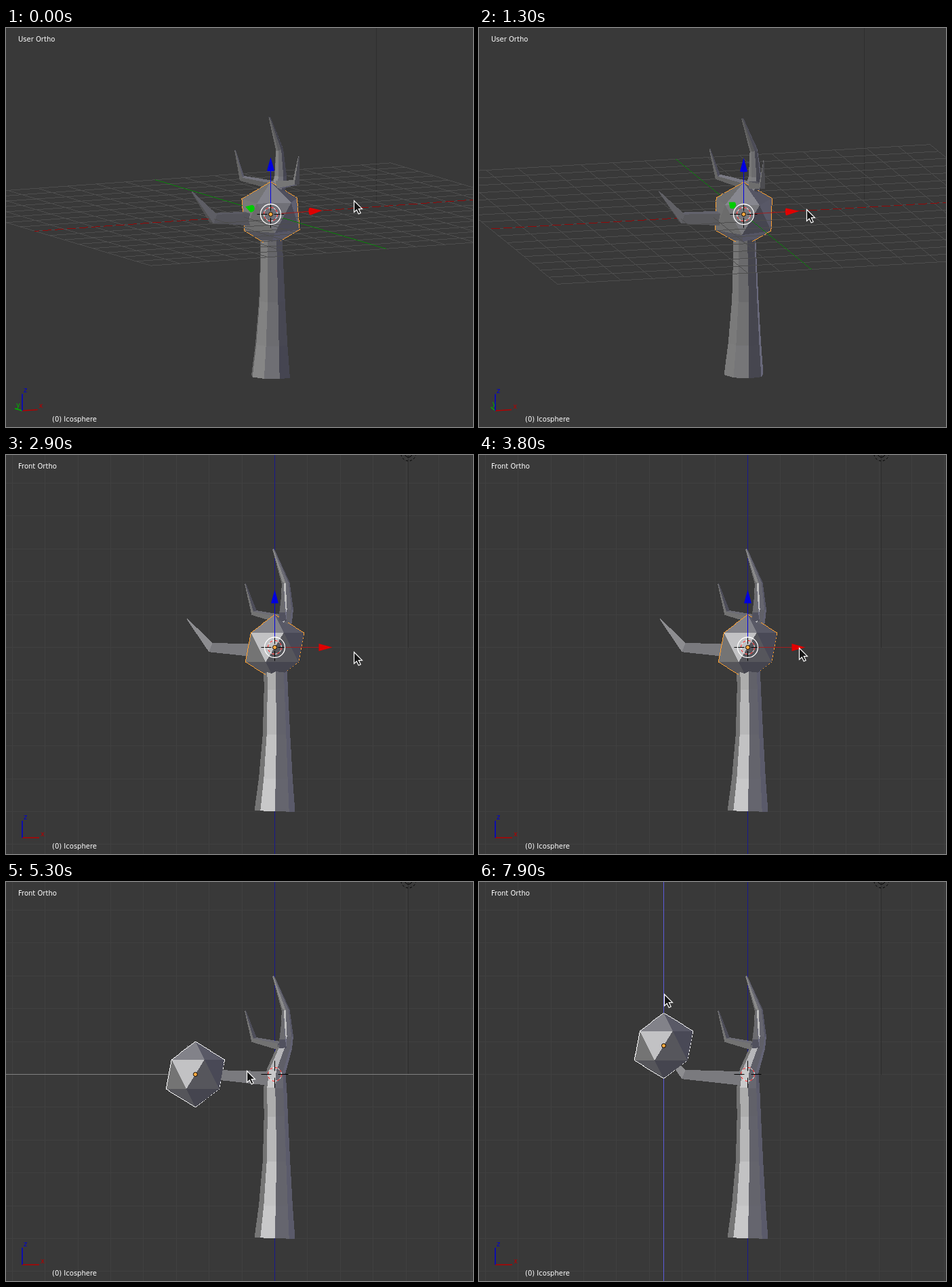
An HTML page with a canvas for the animation above (8 s loop, 689 by 588 pixels).

```html
<!DOCTYPE html>
<html lang="en">
<head>
<meta charset="utf-8">
<title>Viewport</title>
<style>
html, body { margin: 0; width: 100%; height: 100%; overflow: hidden; background: #393939; }
canvas { position: absolute; left: 0; top: 0; display: block; }
.label { position: absolute; font: 10px/12px "DejaVu Sans", sans-serif; color: #fff; white-space: pre; }
#view { left: 18px; top: 11px; }
#object { left: 68px; top: 571px; }
</style>
</head>
<body>
<canvas id="stage" width="689" height="588"></canvas>
<div class="label" id="view">User Ortho</div>
<div class="label" id="object">(0) Icosphere</div>
<script>
const W = 689, H = 588, UNIT = 48.4, FAR = 1000;
const LOOP = 8000, STEP = 100, FRONT_AT = 2900;
const ctx = document.getElementById('stage').getContext('2d');
const viewLabel = document.getElementById('view');
const image = ctx.createImageData(W, H);
const pixels = new Uint32Array(image.data.buffer);
const depth = new Float32Array(W * H);

const span = (t, from, to) => Math.min(1, Math.max(0, (t - from) / (to - from)));
const easeOut = (u, power) => 1 - (1 - u) ** power;
const mix = (a, b, f) => a + (b - a) * f;
const arc = u => Math.sin(Math.PI * u);

// The pointer drives everything: it orbits the view, then drags the ball along x and z.
function pose(t) {
  const orbit = span(t, 800, 1800), reach = span(t, 3300, 3800);
  const drag = easeOut(span(t, 4000, 6100), 3);
  const back = easeOut(span(t, 6300, 7200), 2.5);
  const ball = [-124 * drag, 0, 42.3 * span(t, 7200, 7900)];
  let mouse;
  if (t <= 3300) mouse = [513 - 30 * arc(orbit), 254 + 36 * orbit ** 1.5];
  else if (t <= 4000) mouse = [mix(513, 472, reach), mix(290, 284, reach) - 9 * arc(reach)];
  else mouse = [mix(472 + ball[0], 273, back), mix(284 - 6 * drag, 207, back) - ball[2]];
  return { az: 26.1 - 11.2 * arc(orbit), el: 8.4 + 14.4 * orbit ** 1.8, ball, mouse };
}

const sub = (a, b) => a.map((v, i) => v - b[i]);
const dot = (a, b) => a[0] * b[0] + a[1] * b[1] + a[2] * b[2];
const cross = (a, b) => [a[1] * b[2] - a[2] * b[1], a[2] * b[0] - a[0] * b[2], a[0] * b[1] - a[1] * b[0]];
const unit = a => { const n = Math.hypot(...a); return a.map(v => v / n); };
const rgb = (r, g, b) => (255 << 24 | b << 16 | g << 8 | r) >>> 0;

// Icosphere: two poles and two staggered rings of five.
const ball = [[0, 0, UNIT], [0, 0, -UNIT]];
for (let i = 0; i < 10; i++) {
  const a = i * Math.PI / 5, r = UNIT * 2 / Math.sqrt(5);
  ball.push([r * Math.cos(a), r * Math.sin(a), (i % 2 ? -1 : 1) * r / 2]);
}
const near = (i, j) => Math.hypot(...sub(ball[i], ball[j])) < UNIT * 1.2;
const ballFaces = [], ballEdges = [];
for (let i = 0; i < 12; i++) for (let j = i + 1; j < 12; j++) {
  if (!near(i, j)) continue;
  ballEdges.push([i, j]);
  for (let k = j + 1; k < 12; k++) if (near(i, k) && near(j, k)) ballFaces.push([i, j, k]);
}

// Tube along a path of points; side is the fixed cross axis of its rings.
const tree = [];
function tube(path, radius, side, count) {
  const turn = count === 4 ? Math.PI / 4 : 0;
  const rings = path.map((p, i) => {
    const before = path[Math.max(i - 1, 0)], after = path[Math.min(i + 1, path.length - 1)];
    const u = unit(cross(side, unit(sub(after, before))));
    return Array.from({ length: count }, (_, k) => {
      const w = turn + k * 2 * Math.PI / count, c = radius(i) * Math.cos(w), s = radius(i) * Math.sin(w);
      return p.map((v, j) => v + u[j] * c + side[j] * s);
    });
  });
  for (let i = 1; i < rings.length; i++) for (let k = 0; k < count; k++) {
    const m = (k + 1) % count;
    tree.push([rings[i - 1][k], rings[i - 1][m], rings[i][m], rings[i][k]]);
  }
  tree.push(rings[0]);
}

// Trunk: flares towards the root, bends and tapers towards the tip.
const ROOT = -241.5;
const levels = [ROOT, -193.5, -128.5, -62, -20, 5, 40, 56, 95, 145];
const trunkPath = levels.map(z => {
  const x = z < 0 ? 2.5 * arc(z / ROOT) : 19 * arc(z / 140);
  return [x, x / 5, z];
});
tube(trunkPath, i => levels[i] < 0 ? 17 + 13 * (levels[i] / ROOT) ** 2.2 : 14.5 - .09 * levels[i], [0, 1, 0], 8);

// Limb: base, elbow and tip, thinning out to a point.
function limb(thick, base, elbow, tip) {
  const side = unit(cross(sub(elbow, base), sub(tip, elbow)));
  tube([base, elbow, tip], i => [thick, thick * .7, 1][i], side, 4);
}
limb(14.5, [-10, 0, -6], [-94.5, 0, 0], [-129.5, 0, 42]);
limb(7, [8, 2, 42], [-30.5, 34.4, 51], [-43.5, 30.5, 94]);
limb(8, [12, -4, 44], [11.5, -62, 55], [12.5, -69, 95]);

// Camera space: right, up, toward the viewer.
let cam;
function setCamera(az, el, cx, cy) {
  const r = Math.PI / 180;
  cam = { ca: Math.cos(az * r), sa: Math.sin(az * r), ce: Math.cos(el * r), se: Math.sin(el * r), cx, cy };
}
function rotate([x, y, z]) {
  const far = x * cam.sa + y * cam.ca;
  return [x * cam.ca - y * cam.sa, far * cam.se + z * cam.ce, z * cam.se - far * cam.ce];
}
function project(p) {
  const [x, y, n] = rotate(p);
  return [cam.cx + x, cam.cy - y, n];
}

const KEY = unit([-.892, .3, .9]), FILL = unit([.588, .46, .248]), RIM = unit([.216, -.392, -.216]);
const HALF = unit([KEY[0], KEY[1], KEY[2] + 1]);
function shade(n) {
  const lit = l => Math.max(0, dot(n, l));
  const key = .04 + .46 * lit(KEY) + .3 * lit(HALF) ** 35;
  const level = (fill, rim) => Math.min(255, Math.round(255 * (key + fill * lit(FILL) + rim * lit(RIM))));
  const grey = level(.28, .42);
  return rgb(grey, grey, level(.335, .5));
}

function triangle(a, b, c, color) {
  const area = (b[0] - a[0]) * (c[1] - a[1]) - (c[0] - a[0]) * (b[1] - a[1]);
  if (Math.abs(area) < 1e-6) return;
  const x0 = Math.max(0, Math.floor(Math.min(a[0], b[0], c[0]))), x1 = Math.min(W - 1, Math.ceil(Math.max(a[0], b[0], c[0])));
  const y0 = Math.max(0, Math.floor(Math.min(a[1], b[1], c[1]))), y1 = Math.min(H - 1, Math.ceil(Math.max(a[1], b[1], c[1])));
  for (let y = y0; y <= y1; y++) for (let x = x0; x <= x1; x++) {
    const px = x + .5 - a[0], py = y + .5 - a[1];
    const v = (px * (c[1] - a[1]) - (c[0] - a[0]) * py) / area;
    const w = ((b[0] - a[0]) * py - px * (b[1] - a[1])) / area;
    if (v < 0 || w < 0 || v + w > 1) continue;
    const d = a[2] + v * (b[2] - a[2]) + w * (c[2] - a[2]), i = y * W + x;
    if (d > depth[i]) { depth[i] = d; pixels[i] = color; }
  }
}

function face(points) {
  const p = points.map(project);
  let n = unit(cross(sub(p[1], p[0]), sub(p[2], p[0])));
  if (n[2] < 0) n = n.map(v => -v);
  const color = shade([n[0], -n[1], n[2]]);
  for (let i = 2; i < p.length; i++) triangle(p[0], p[i - 1], p[i], color);
}

// Depth-tested hairline; color may be a function of x.
function line(a, b, color, bias = 0) {
  const p = project(a), q = project(b);
  const n = Math.max(1, Math.ceil(Math.max(Math.abs(q[0] - p[0]), Math.abs(q[1] - p[1]))));
  for (let i = 0; i <= n; i++) {
    const f = i / n, x = Math.floor(mix(p[0], q[0], f)), y = Math.floor(mix(p[1], q[1], f));
    if (x < 0 || y < 0 || x >= W || y >= H) continue;
    const k = y * W + x;
    if (mix(p[2], q[2], f) + bias > depth[k]) pixels[k] = typeof color === 'function' ? color(x) : color;
  }
}

const BACK = rgb(57, 57, 57), FLOOR = rgb(77, 77, 77), FAINT = rgb(64, 64, 64), DROP = rgb(46, 46, 46);
const WHITE = rgb(255, 255, 255), ORANGE = rgb(255, 160, 48);
const lamp = [4.076, 1.005, 5.904].map(v => v * UNIT);

function drawFloor(flat) {
  const e = 8 * UNIT;
  for (let i = -8; i <= 8; i++) {
    if (!i) continue;
    line([-e, i * UNIT, 0], [e, i * UNIT, 0], FLOOR);
    line([i * UNIT, -e, 0], [i * UNIT, e, 0], FLOOR);
  }
  const [period, on] = flat ? [18, 13] : [6, 5];
  line([-e, 0, 0], [e, 0, 0], x => x % period < on ? rgb(150, 8, 8) : FLOOR);
  line([0, -e, 0], [0, e, 0], rgb(10, 128, 10));
}

function drawWall() {
  for (let i = -9; i <= 9; i++) {
    line([-FAR, FAR, i * UNIT], [FAR, FAR, i * UNIT], FAINT);
    line([i * UNIT, FAR, -FAR], [i * UNIT, FAR, FAR], FAINT);
  }
  line([0, FAR, -FAR], [0, FAR, FAR], rgb(24, 24, 140));
}

function drawBall(pos, color) {
  const pts = ball.map(p => p.map((v, i) => v + pos[i]));
  const facing = ballFaces.map(f => rotate([0, 1, 2].map(j => f.reduce((s, i) => s + ball[i][j], 0)))[2] > 0);
  ballFaces.forEach(f => face(f.map(i => pts[i])));
  for (const [i, j] of ballEdges) {
    const sides = facing.filter((_, k) => ballFaces[k].includes(i) && ballFaces[k].includes(j));
    if (sides[0] !== sides[1]) line(pts[i], pts[j], color, 6);
  }
}

function stroke(color, width, ...segments) {
  ctx.strokeStyle = color;
  ctx.lineWidth = width;
  ctx.beginPath();
  for (const [x0, y0, x1, y1] of segments) { ctx.moveTo(x0, y0); ctx.lineTo(x1, y1); }
  ctx.stroke();
}
function ring(x, y, r, color, width, dash = []) {
  ctx.setLineDash(dash);
  ctx.strokeStyle = color;
  ctx.lineWidth = width;
  ctx.beginPath();
  ctx.arc(x, y, r, 0, 2 * Math.PI);
  ctx.stroke();
  ctx.setLineDash([]);
}

function drawCursor3d(x, y) {
  const dash = 10 * Math.PI / 8;
  ring(x, y, 10, '#fff', 1);
  ring(x, y, 10, '#f00', 1, [dash, dash]);
  stroke('#000', 1, [x - 20, y, x - 5, y], [x + 5, y, x + 20, y], [x, y - 20, x, y - 5], [x, y + 5, x, y + 20]);
}

const AXES = [
  { name: 'y', dir: [0, 1, 0], color: '#0c0', stem: '#0c0', dark: '#00b400' },
  { name: 'x', dir: [1, 0, 0], color: '#e00000', stem: '#a02020', dark: '#b40000' },
  { name: 'z', dir: [0, 0, 1], color: '#0000e0', stem: '#0000e0', dark: '#0000d0' }
];

function drawGizmo(x, y) {
  for (const { dir, color, stem } of AXES) {
    const [ax, up] = rotate(dir), len = Math.hypot(ax, up);
    if (len < .05) continue;
    ctx.save();
    ctx.translate(x, y);
    ctx.rotate(Math.atan2(-up, ax));
    if (len > .7) stroke(stem, 1, [15, 0, 65 * len, 0]);
    ctx.fillStyle = color;
    ctx.beginPath();
    ctx.moveTo(65 * len, -5.5);
    ctx.lineTo(85 * len, 0);
    ctx.lineTo(65 * len, 5.5);
    ctx.ellipse(65 * len, 0, 5.5 * Math.sqrt(Math.max(0, 1 - len * len)), 5.5, 0, Math.PI / 2, Math.PI * 1.5);
    ctx.fill();
    ctx.restore();
  }
  ring(x, y, 15, '#fff', 1.3);
}

function drawTripod() {
  ctx.font = '10px "DejaVu Sans", sans-serif';
  for (const { name, dir, dark } of AXES) {
    const [dx, up] = rotate(dir);
    if (Math.hypot(dx, up) < .05) continue;
    const x = 24 + dx * 25, y = 564 - up * 25;
    stroke(dark, 1.5, [24, 564, x, y]);
    ctx.fillStyle = dark;
    ctx.fillText(name, x + 2, y - 2);
  }
}

const arrow = new Path2D('M.5 .5V17.5L4.3 14 7.2 20 10.2 18.6 7.3 12.6H12.5Z');
function drawMouse([x, y]) {
  ctx.save();
  ctx.translate(Math.round(x), Math.round(y));
  ctx.fillStyle = '#151515';
  ctx.fill(arrow);
  ctx.strokeStyle = '#fff';
  ctx.lineWidth = 1.2;
  ctx.stroke(arrow);
  ctx.restore();
}

function draw(t) {
  const front = t >= FRONT_AT;
  const slideX = t >= 4100 && t < 6400, slideZ = t >= 7300, held = slideX || slideZ;
  const { az, el, ball: pos, mouse } = pose(t);
  if (front) setCamera(0, 0, 396.5, 283.5);
  else setCamera(az, el, 390.5, 274.5);

  pixels.fill(BACK);
  depth.fill(-1e5);
  if (front) drawWall();
  line([lamp[0], lamp[1], 0], lamp, DROP);
  tree.forEach(face);
  drawBall(pos, held ? WHITE : ORANGE);
  if (!front) drawFloor(el < 16);
  if (slideX) line([-FAR, 0, 0], [FAR, 0, 0], rgb(128, 128, 128));
  if (slideZ) line([pos[0], 0, -FAR], [pos[0], 0, FAR], rgb(92, 92, 220));
  ctx.putImageData(image, 0, 0);

  const [lx, ly] = project(lamp);
  ring(lx, ly, 5.5, '#000', 1);
  ring(lx, ly, 11, '#000', 1, [3, 3]);
  drawCursor3d(cam.cx, cam.cy);
  const [bx, by] = project(pos);
  if (!held) drawGizmo(bx, by);
  ctx.fillStyle = '#ffaa40';
  ctx.beginPath();
  ctx.arc(bx, by, 3, 0, 2 * Math.PI);
  ctx.fill();
  ring(bx, by, 3, '#000', 1);
  drawTripod();
  drawMouse(mouse);
  viewLabel.textContent = front ? 'Front Ortho' : 'User Ortho';
}

let start, shown = -1;
function tick(now) {
  if (start === undefined) start = now;
  const t = Math.floor((now - start) % LOOP / STEP) * STEP;
  if (t !== shown) draw(shown = t);
  requestAnimationFrame(tick);
}
draw(0);
requestAnimationFrame(tick);
</script>
</body>
</html>
```
